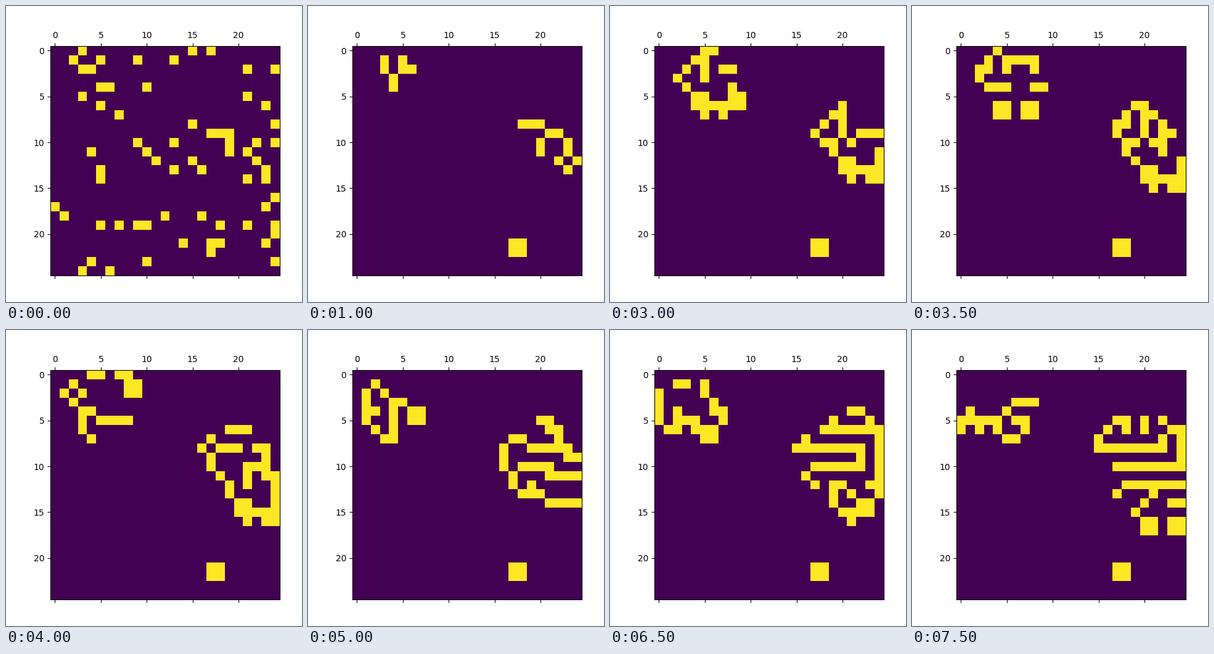
Recreate the animation shown at these times as a matplotlib script. Size 480 by 480 pixels, loop 8 s.

```python
import numpy as np
import matplotlib.pyplot as plt
from matplotlib.animation import FuncAnimation

SIZE = 25
STEPS = 16
LIVE_CELLS = 67

# (row, column) of the cells that found each lasting colony
TOP_LEFT = [(1, 5), (2, 3), (2, 4), (4, 5), (4, 6), (6, 5)]
RIGHT = [(9, 17), (9, 18), (9, 19), (10, 19), (11, 19),
         (10, 22), (11, 21), (12, 22), (13, 23), (14, 23)]
BLOCK = [(21, 17), (21, 18), (22, 17)]


def sweep(grid):
    """One Life step updated in place, row by row, with dead borders."""
    grid = grid.copy()
    for r in range(SIZE):
        for c in range(SIZE):
            block = grid[max(r - 1, 0):r + 2, max(c - 1, 0):c + 2]
            near = block.sum() - grid[r, c]
            grid[r, c] = int(near == 3 or (near == 2 and grid[r, c] == 1))
    return grid


def scatter(grid, rng):
    """Add random cells that die out within two steps."""
    fate = sweep(sweep(grid))
    for cell in rng.permutation(SIZE * SIZE):
        if grid.sum() == LIVE_CELLS:
            break
        trial = grid.copy()
        trial.flat[cell] = 1
        if np.array_equal(sweep(sweep(trial)), fate):
            grid = trial
    return grid


start = np.zeros((SIZE, SIZE), dtype=int)
for row, col in TOP_LEFT + RIGHT + BLOCK:
    start[row, col] = 1

history = [scatter(start, np.random.default_rng(4))]
while len(history) < STEPS:
    history.append(sweep(history[-1]))

fig = plt.figure(figsize=(4.8, 4.8), dpi=100)
ax = fig.add_axes((0.15, 0.09, 0.775, 0.775))
image = ax.matshow(history[0], vmin=0, vmax=1)


def update(step):
    image.set_data(history[step])
    return [image]


anim = FuncAnimation(fig, update, frames=STEPS, interval=500,
                     repeat=True, repeat_delay=0)
plt.show()
```
